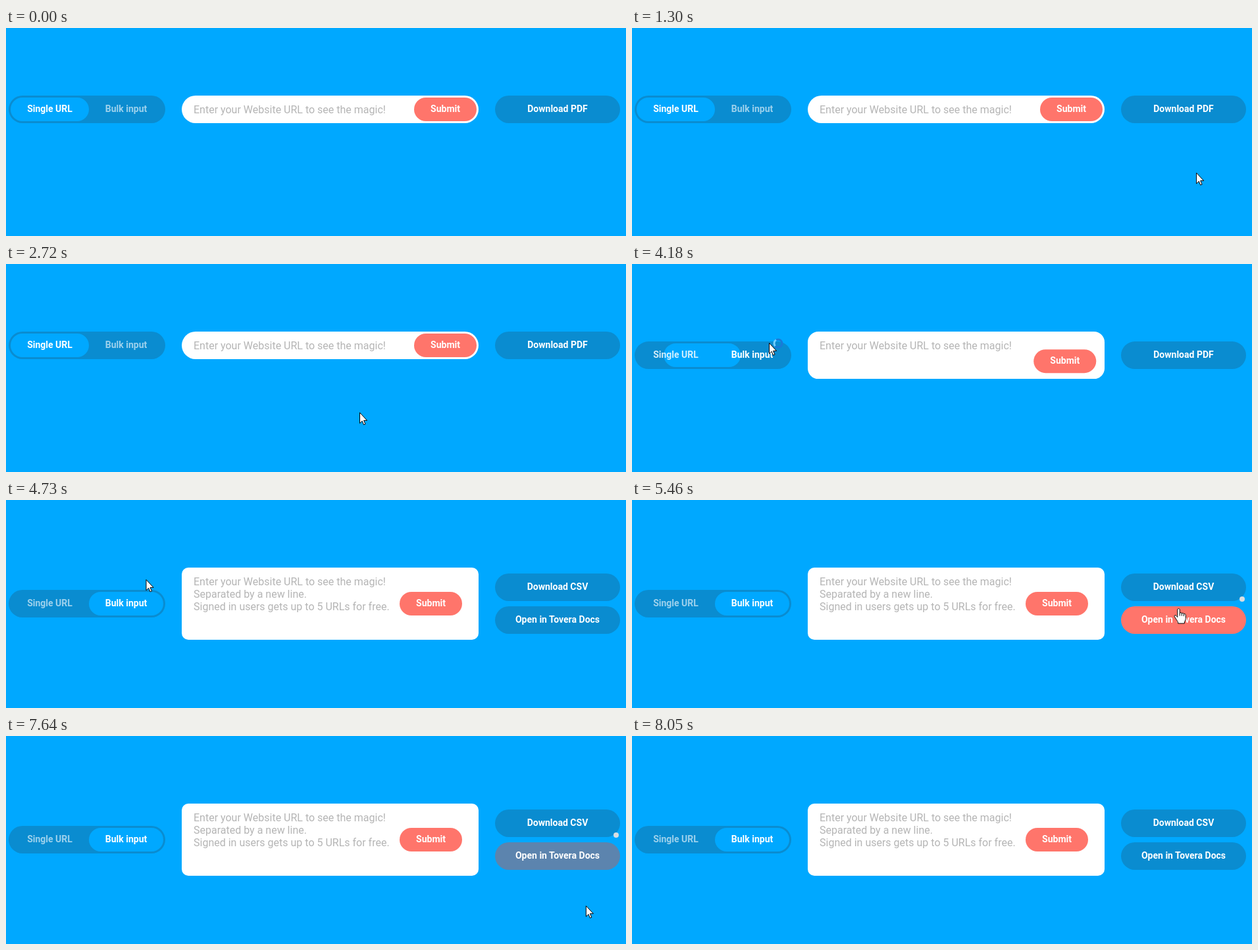
An HTML page that plays this animation: 942x317 px, repeating every 8860 ms.

```html
<!DOCTYPE html>
<html lang="en">
<head>
<meta charset="utf-8">
<title>URL form</title>
<style>
  html, body { margin: 0; width: 100%; height: 100%; overflow: hidden; background: #00a8ff; }
  svg { display: block; width: 100%; height: 100%; }
  text { font: 700 14px Roboto, Arial, sans-serif; fill: #fff; text-anchor: middle; }
  #hint text { font-weight: 400; font-size: 16px; fill: #b5b5b5; text-anchor: start; }
  .dark { fill: #0a8cd0; }
  .coral { fill: #ff756b; }
  .ink { fill: #fff; stroke: #000; stroke-width: 1; stroke-linejoin: round; }
</style>
</head>
<body>
<svg viewBox="0 0 942 317">
  <g id="toggle">
    <rect class="dark" x="4" width="238" height="42" rx="21"/>
    <rect id="knob" y="3" height="36" rx="18" fill="#00a8ff"/>
    <text id="single" x="66.5" y="25">Single URL</text>
    <text id="bulk" x="182.5" y="25">Bulk input</text>
  </g>

  <rect id="field" x="267" y="103" width="451" fill="#fff"/>
  <g id="hint">
    <text x="285" y="130">Enter your Website URL to see the magic!</text>
    <g id="more">
      <text x="285" y="149">Separated by a new line.</text>
      <text x="285" y="168">Signed in users gets up to 5 URLs for free.</text>
    </g>
  </g>
  <g id="submit">
    <rect class="coral" width="95" height="36" rx="18"/>
    <text x="47.5" y="22">Submit</text>
  </g>

  <g id="buttons"></g>
  <circle id="dot" cx="927" cy="151" r="4" fill="#d9dee2"/>

  <g id="pointer">
    <g id="arrow">
      <path class="ink" d="M.5 .5V16.8L4.2 13.3 6.6 19 9 18 6.6 12.4H11.6Z"/>
      <g id="spinner" fill="none" stroke-width="3">
        <circle cx="14" cy="1" r="6" stroke="#1a7ad8"/>
        <path d="M9.5 5A6 6 0 0 1 11 -4.2" stroke="#6fd0ff"/>
      </g>
    </g>
    <g id="hand" class="ink">
      <path d="M-2 1.5C-2-.5 1.5-.5 1.5 1.5V7C2 5.5 4.5 5.8 4.6 7.4 5.5 6.2 7.5 6.6 7.6 8.2 8.6 7.4 10.5 8 10.5 9.8V15C10.5 18 8.5 19 8.5 22.5H-1C-1 19.5-3 18-5 14.5L-6.6 11.8C-7 10-5 9.3-3.8 10.8L-2 13Z"/>
      <path d="M1.5 7V11M4.6 7.4V11M7.6 8.2V11.5" fill="none"/>
    </g>
    <path id="beam" d="M-3-7.5H-1L0-7 1-7.5H3M0-7V7M-3 7.5H-1L0 7 1 7.5H3" fill="none" stroke="#222"/>
  </g>
</svg>
<script>
const LOOP = 8860, EXPAND = 4180, FADE = 150;

const $ = id => document.getElementById(id);
const show = (id, on) => $(id).style.display = on ? '' : 'none';
const place = (id, x, y) => $(id).setAttribute('transform', `translate(${x} ${y})`);
const set = (id, attrs) => Object.entries(attrs).forEach(([k, v]) => $(id).setAttribute(k, v));
const clamp = v => Math.min(1, Math.max(0, v));
const mix = (a, b, k) => a + (b - a) * k;
const easeOut = k => 1 - (1 - k) ** 3;

// Buttons sit at an offset from the vertical middle of the form
const buttons = {
  pdf: { label: 'Download PDF', offset: 0, bulk: false },
  csv: { label: 'Download CSV', offset: -25, bulk: true },
  docs: { label: 'Open in Tovera Docs', offset: 25, bulk: true }
};
$('buttons').innerHTML = Object.entries(buttons).map(([id, { label }]) =>
  `<g id="${id}"><rect x="743" width="190" height="42" rx="21"/>
   <text x="838" y="25">${label}</text></g>`).join('');

// Each move starts where the previous one ended; sag bends it downwards
const start = { x: 858, y: 256 };
const moves = [
  { from: 1250, to: 1710, x: 855, y: 136, sag: 0 },
  { from: 2490, to: 2720, x: 537, y: 226, sag: 20 },
  { from: 2970, to: 3590, x: 208, y: 120, sag: 30 },
  { from: 4730, to: 5010, x: 626, y: 206, sag: 0 },
  { from: 5200, to: 5630, x: 844, y: 163, sag: 0 },
  { from: 6030, to: 6410, x: 836, y: 135, sag: 0 },
  { from: 7470, to: 8050, x: 905, y: 325, sag: 0 }
];

function pointerAt(t) {
  let { x, y } = start;
  for (const move of moves) {
    const k = easeOut(clamp((t - move.from) / (move.to - move.from)));
    x = mix(x, move.x, k);
    y = mix(y, move.y, k) + move.sag * 4 * k * (1 - k);
  }
  return { x, y };
}

// The form is already partly open when it first changes
const growth = t => t < EXPAND ? 0 : clamp((t - EXPAND + 165) / 375);
const rowTop = t => 103 + 34 * growth(t);
const isBulk = t => t >= EXPAND + 100;

function within(t, left, top, width, height) {
  const { x, y } = pointerAt(t);
  return x >= left && x <= left + width && y >= top && y <= top + height;
}
const overButton = (id, t) => buttons[id].bulk === isBulk(t) &&
  within(t, 743, rowTop(t) + buttons[id].offset, 190, 42);
const overBulk = t => within(t, 126, rowTop(t), 116, 42);
const overField = t => within(t, 267, 103, 451, 42 + 68 * growth(t));

// Share of the last FADE ms for which a test held
function fade(test, t, samples = 15) {
  let hits = 0;
  for (let i = 0; i < samples; i++) hits += test(t - i * FADE / samples);
  return hits / samples;
}

function drawForm(t) {
  const grow = growth(t), slide = grow ** 1.3, top = rowTop(t);
  place('toggle', 0, top);
  set('knob', { x: mix(7, 126, slide), width: mix(119, 113, slide) });
  set('single', { opacity: mix(1, .6, grow) });
  set('bulk', { opacity: mix(.6, 1, Math.max(fade(overBulk, t), grow)) });
  set('field', { height: mix(42, 110, grow), rx: mix(21, 10, grow) });
  place('submit', mix(620, 598, grow), mix(106, 140, grow ** .42));
  show('more', isBulk(t));
  show('dot', t >= 4900 && t < 7700);

  for (const [id, { offset, bulk }] of Object.entries(buttons)) {
    const heat = fade(s => overButton(id, s), t) * 100;
    show(id, bulk === isBulk(t));
    place(id, 0, top + offset);
    $(id).firstChild.style.fill = `color-mix(in srgb, #ff756b ${heat}%, #0a8cd0)`;
  }
}

function drawPointer(t) {
  const { x, y } = pointerAt(t);
  const shape = Object.keys(buttons).some(id => overButton(id, t)) ? 'hand'
    : overField(t) ? 'beam' : 'arrow';
  for (const id of ['arrow', 'hand', 'beam']) show(id, id === shape);
  show('spinner', t >= EXPAND && t < moves[3].from);
  show('pointer', t >= moves[0].from && t < moves.at(-1).to);
  place('pointer', x, y);
}

function tick() {
  const t = performance.now() % LOOP;
  drawForm(t);
  drawPointer(t);
  requestAnimationFrame(tick);
}
tick();
</script>
</body>
</html>
```
